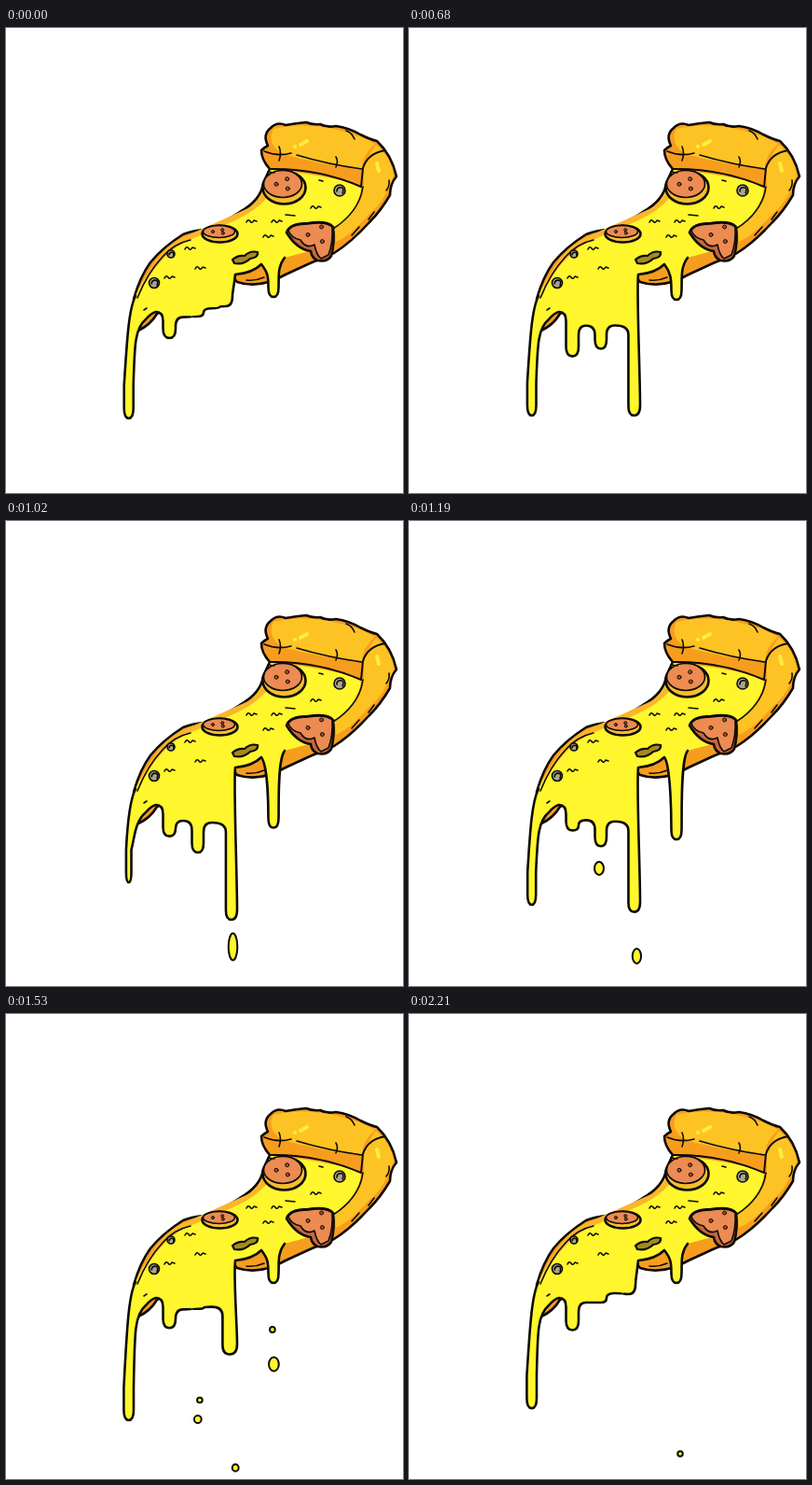
Write an HTML page that moves like this. It is 426x498 px and loops after 2.38 s.

```html
<!DOCTYPE html>
<html lang="en">
<head>
<meta charset="utf-8">
<title>Dripping pizza</title>
<style>
  html, body { margin: 0; width: 100%; height: 100%; overflow: hidden; background: #fff; }
  svg { display: block; width: 100%; height: 100%; }
  .ink { stroke: #0d0b08; stroke-width: 2.6; stroke-linecap: round; stroke-linejoin: round; }
  .thin { stroke-width: 1.6; }
  .line { fill: none; }
  .cheese { fill: #fff62d; }
  .crust { fill: #fdc324; }
  .shade { fill: #f79d1e; }
  .pepperoni { fill: #ec8b52; }
  .rim { fill: #f6bd2e; }
  .spot { fill: #ad5424; stroke-width: 1; }
  .ring { fill: #a9a58d; }
  .drop { stroke-width: 2; }
</style>
</head>
<body>
<svg viewBox="0 0 426 498">
  <defs>
    <path id="squiggle" class="ink thin line" d="M-5 1q2-4 4-1t4-1l3 1"/>
  </defs>

  <path id="slice" class="ink shade" d="M137 290Q144 266 155 251Q168 235 190 221Q200 217 212 216Q235 208 251 197Q274 184 276 166L283 151Q274 141 274 131Q277 128 281 126Q275 114 284 107Q291 100 300 104Q311 102 322 101Q329 104 337 103Q344 107 354 105Q368 107 380 114Q390 119 398 121Q414 136 419 159Q412 167 412 179Q402 196 390 208Q370 230 352 241Q325 252 300 264Q272 280 248 272L240 262L162 306Q155 318 142 324Z"/>

  <path id="cheese" class="cheese"/>
  <path id="edge" class="ink line"/>
  <path fill="#fbb52a" d="M141 287Q160 237 190 224T262 192Q274 183 277 172L279 183Q266 197 246 206T192 229Q164 244 141 287Z"/>
  <path class="ink thin line" d="M141 289Q152 262 168 245Q180 231 198 227"/>

  <!-- crust -->
  <path class="crust" d="M287 108Q330 98 380 116L396 124Q382 136 382 151Q335 146 297 135Q279 124 287 108Z"/>
  <path class="crust" d="M397 125Q414 140 416 158Q406 187 390 199Q370 222 354 229L353 214Q384 193 384 168V150Q388 137 397 125Z"/>
  <g class="ink thin line">
    <path stroke-width="2" d="M283 151Q335 150 381 170L383 150Q388 134 407 131"/>
    <path d="M383 170Q379 197 351 215M277 132Q291 138 306 134M312 136Q345 146 382 151"/>
    <path d="M293 127Q296 134 293 142M354 138Q357 143 354 149M365 110Q371 112 374 119M408 174Q412 169 411 163M389 205l6-8M371 222l8-9M258 270q10 1 19-3"/>
  </g>
  <path stroke="#ffef3a" stroke-width="4" stroke-linecap="round" d="M316 125l7-4M310 127h.1M398 145l2 8"/>

  <!-- toppings -->
  <g class="ink">
    <ellipse class="rim" cx="298.500" cy="171" rx="23" ry="17.500"/>
    <ellipse class="pepperoni thin" cx="297" cy="167" rx="20.500" ry="14.500"/>
    <ellipse class="rim" cx="229.500" cy="220.500" rx="19" ry="9"/>
    <ellipse class="pepperoni thin" cx="228.500" cy="218" rx="17" ry="6.500"/>
    <path fill="#c9683a" d="M301 219Q304 209 324 209Q345 206 351 213Q353 230 349 244Q345 251 334 249Q328 246 327 239Q312 237 301 219Z"/>
    <path class="pepperoni thin" d="M303 217Q307 210 324 210Q343 207 350 213Q351 230 346 243L338 247Q333 243 331 232Q322 237 316 227Q306 225 303 217Z"/>
    <path fill="#a68a1e" stroke-width="2.200" d="M243 248Q249 243 256 244Q262 238 270 240Q271 246 262 247Q255 254 245 252Z"/>
    <path class="thin line" d="M300 200l10 1M148 302l3-2M281 154l7 1M336 163l4 1"/>
  </g>
  <g id="details" class="ink"></g>
  <g id="drops"></g>
</svg>

<script>
const STEP = 170, COUNT = 14;
const $ = id => document.getElementById(id);

function make(tag, attrs, parent) {
  const node = document.createElementNS('http://www.w3.org/2000/svg', tag);
  for (const name in attrs) node.setAttribute(name, attrs[name]);
  return parent.appendChild(node);
}

const dot = (cx, cy, r, kind) => make('circle', { class: kind, cx, cy, r }, $('details'));

// Three spots on each pepperoni, spread around its middle.
for (const [x, y, rx, ry, r] of [[298, 167, 8, 6, 2], [229, 218, 7, 2, 1.5], [334, 221, 10, 9, 2]])
  for (let i = 0; i < 3; i++) {
    const angle = 1 + i * Math.PI * 2 / 3;
    dot(x + rx * Math.cos(angle), y + ry * Math.sin(angle), r, 'spot');
  }

for (const [x, y, r] of [[358, 174, 6], [177, 242, 4], [159, 273, 5.5]]) {
  dot(x, y, r, 'ring thin');
  make('path', { class: 'thin line', d: `M${x - r / 2} ${y + 1}q0 ${-r * 0.7} ${r * 0.7} ${-r * 0.7}t2 ${r}` }, $('details'));
}

for (const [x, y] of [[197, 236], [175, 267], [208, 257], [281, 223], [332, 192], [290, 207], [263, 207]])
  make('use', { href: '#squiggle', x, y }, $('details'));

// Key points [step, lowest y] of every drip; the motion between them is eased.
const drips = {
  left:   [[0, 419], [2, 425], [4, 416], [6, 388], [8, 436], [11, 436]],
  second: [[0, 333], [3, 355], [8, 330], [11, 359]],
  third:  [[0, 310], [6, 356], [10, 310]],
  fourth: [[0, 299], [4, 416], [5, 457], [6, 428], [12, 303]],
  right:  [[0, 289], [2, 304], [4, 292], [7, 342], [9, 289]]
};

function tipAt(keys, k) {
  const i = keys.findLastIndex(([step]) => step <= k);
  const [s0, y0] = keys[i];
  const [s1, y1] = keys[i + 1] || [COUNT, keys[0][1]];
  const eased = (1 - Math.cos(Math.PI * (k - s0) / (s1 - s0))) / 2;
  return y0 + (y1 - y0) * eased - 1;
}

// Flank between a gap and a tip, upright along x = m, level at both ends.
function flank(x0, y0, x1, y1, m) {
  const r = Math.sign(y1 - y0) * Math.min(10, Math.abs(y1 - y0) / 2);
  return `L${x0} ${y0}Q${m} ${y0} ${m} ${y0 + r}L${m} ${y1 - r}Q${m} ${y1} ${x1} ${y1}`;
}

// Rounded end from (x0, y - h) to (x1, y - h).
const tip = (x0, x1, y, h) =>
  `L${x0} ${y - h}Q${x0} ${y} ${(x0 + x1) / 2} ${y}Q${x1} ${y} ${x1} ${y - h}`;

function dripEdge(k) {
  const [left, second, third, fourth, right] = Object.values(drips).map(keys => tipAt(keys, k));
  const swing = Math.cos(2 * Math.PI * (k - 6) / COUNT);
  const gap1 = 315 + 6 * swing, gap2 = 311 + 12 * swing;
  const half = 2.8 + Math.min(2.5, (left - 387) / 14);
  const l0 = 131.7 - half, l1 = 131.7 + half;
  const len = Math.max(0, fourth - gap2);
  const f0 = 229 + Math.min(7, len / 15), f1 = 243 + Math.min(5, len / 10);
  return `M139 287C132 300 130 330 ${l0} ${left - 35}` + tip(l0, l1, left, 11)
    + `L${l1} ${left - 35}C138 340 138 322 150 312Q156 305 161 304`
    + flank(161, 304, 175.5, second, 168.5)
    + flank(175.5, second, 190, gap1, 182)
    + flank(190, gap1, 206, third, 199.5)
    + flank(206, third, 221, gap2, 212)
    + flank(221, gap2, (f0 + f1) / 2, fourth, f0)
    + `Q${f1} ${fourth} ${f1} ${fourth - 11}C${f1} ${fourth - 16 - len * 0.3} 244 282 246 264`
    + `C258 263 268 259 274 253C281 262 281.500 ${right - 22} 281.500 ${right - 10}`
    + tip(281.5, 292.5, right, 10)
    + `C293 ${right - 22} 291 256 299 246`;
}

const cheeseTop = 'L325 239Q382 200 381 169Q340 156 284 152L278 168Q273 187 252 199'
  + 'Q236 210 212 218C180 224 160 245 139 287Z';

// Falling drops: they start stretched, turn round and shrink.
const drops = [
  { first: 6, last: 10, x: 243.5, y: 456, r: 4.8, stretch: 2, speed: 10 },
  { first: 7, last: 10, x: 204, y: 372, r: 5, stretch: 0.4, speed: 31 },
  { first: 8, last: 11, x: 207, y: 382.5, r: 3, stretch: 0, speed: 31 },
  { first: 8, last: 13, x: 286.5, y: 351, r: 5.5, stretch: 1.1, speed: 24 },
  { first: 8, last: 11, x: 285, y: 324.5, r: 3, stretch: 0.2, speed: 13.5 },
  { first: 11, last: 12, x: 131, y: 457.5, r: 4.3, stretch: 0.1, speed: 13 }
].map(drop => ({ ...drop, node: make('ellipse', { class: 'ink cheese drop' }, $('drops')) }));

function drawDrop({ first, last, x, y, r, stretch, speed, node }, k) {
  const age = k - first;
  node.style.display = age >= 0 && k <= last ? '' : 'none';
  const size = r * (1 - 0.5 * (age / (last - first)) ** 2);
  node.setAttribute('cx', x + age * 0.9);
  node.setAttribute('cy', y + age * speed);
  node.setAttribute('rx', Math.max(0, size));
  node.setAttribute('ry', Math.max(0, size * (1 + stretch * 0.35 ** age)));
}

function draw(k) {
  const edge = dripEdge(k);
  $('edge').setAttribute('d', edge);
  $('cheese').setAttribute('d', edge + cheeseTop);
  drops.forEach(drop => drawDrop(drop, k));
}

const start = performance.now();
let shown = -1;
function tick() {
  const k = Math.floor((performance.now() - start) / STEP) % COUNT;
  if (k !== shown) draw(shown = k);
  requestAnimationFrame(tick);
}
tick();
</script>
</body>
</html>
```
